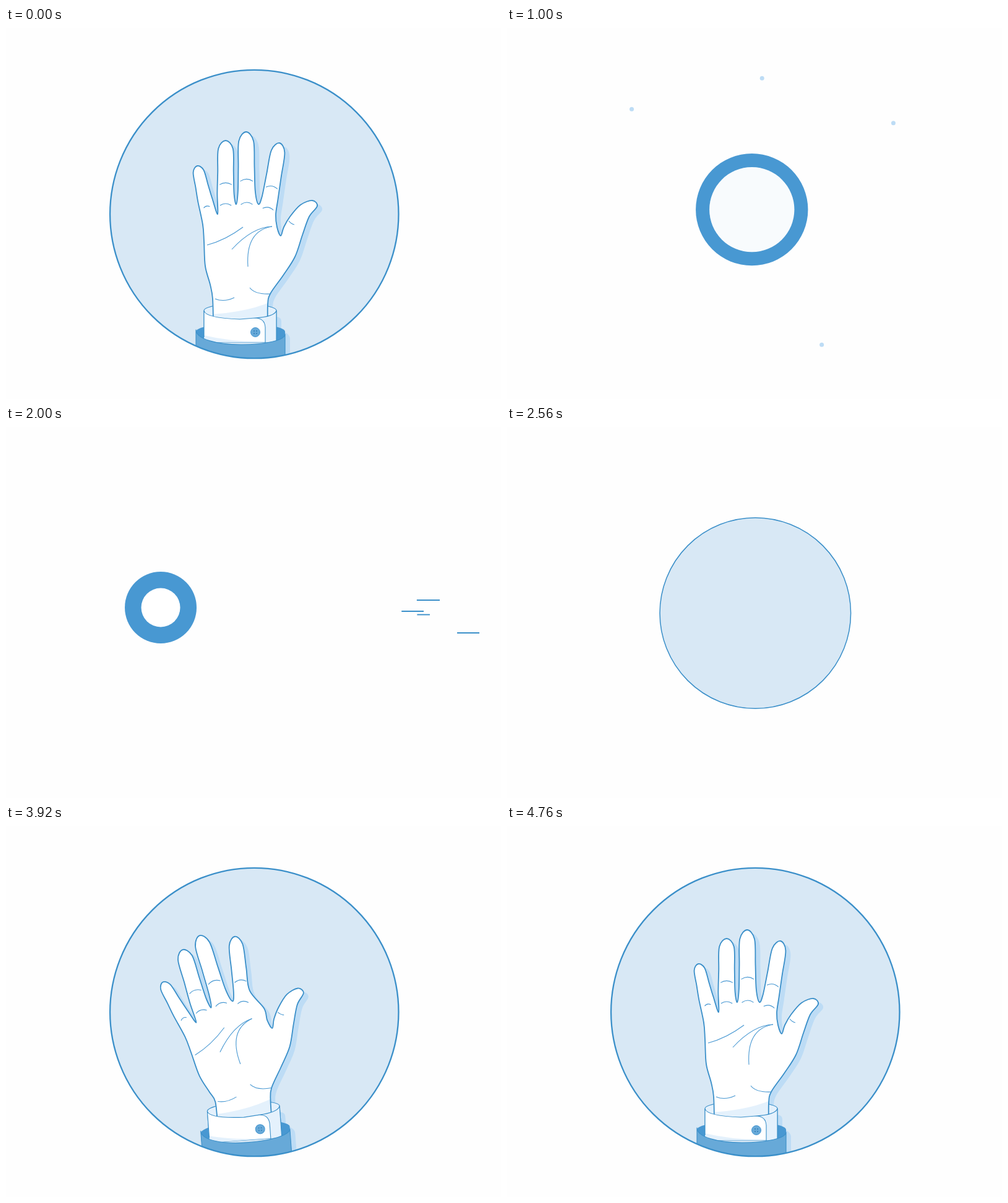
Write an HTML page with a canvas that moves like this. It is 800 by 600 pixels and loops after 4.8 s.

```html
<!DOCTYPE html>
<html lang="en">
<head>
<meta charset="utf-8">
<title>Waving hand</title>
<style>
  html, body { margin: 0; width: 100%; height: 100%; overflow: hidden; background: #fefefe; }
  canvas { display: block; }
</style>
</head>
<body>
<canvas id="stage" width="800" height="600"></canvas>
<script>
const ctx = document.getElementById('stage').getContext('2d');
const LOOP = 4800;
const INK = '#3a8fc9', BLUE = '#4898d2', SLEEVE = '#67a9d8', SKY = '#d8e8f5',
      SHADE = '#bddcf5', PALE = '#e4f1fc', WHITE = '#fff';

// time, lean in degrees, x and y shift, curl
const keys = [
  [40, 0, 0, 0, 0], [520, -8, -27, -4, 1], [720, -8, -27, -4, 1], [1000, -8, -27, 300, 1],
  [2760, 10.5, 17, 385, 0], [3200, 10.5, 17, 95, 0], [3900, -17, 7, 0, 0],
  [4220, 0, 0, 0, 0], [4480, -17, 7, 0, 0], [4740, 0, 0, 0, 0]
];

const clamp = x => Math.min(1, Math.max(0, x));
const span = (t, a, b) => clamp((t - a) / (b - a));
const smooth = x => x * x * (3 - 2 * x);
const easeOut = (x, n) => 1 - (1 - x) ** n;
const mix = (a, b, k) => a + (b - a) * k;
const radians = deg => deg * Math.PI / 180;

function poseAt(t) {
  const i = keys.findIndex(key => key[0] > t);
  const to = keys[i < 0 ? keys.length - 1 : i];
  const from = i > 0 ? keys[i - 1] : to;
  const k = smooth(span(t, from[0], to[0]));
  const [, lean, dx, dy, curl] = from.map((v, j) => mix(v, to[j], k));
  return { lean, dx, dy, curl };
}

// Catmull-Rom curve through points
function curve(points) {
  const path = new Path2D(), last = points.length - 1;
  const at = i => points[Math.min(last, Math.max(0, i))];
  const handle = (i, s) => [0, 1].map(c => at(i)[c] + s * (at(i + 1)[c] - at(i - 1)[c]) / 6);
  path.moveTo(...points[0]);
  for (let i = 0; i < last; i++)
    path.bezierCurveTo(...handle(i, 1), ...handle(i + 1, -1), ...at(i + 1));
  return path;
}

function draw(path, fill, stroke, width = 1.1) {
  const shape = typeof path === 'string' ? new Path2D(path) : path;
  if (fill) { ctx.fillStyle = fill; ctx.fill(shape); }
  if (stroke) { ctx.strokeStyle = stroke; ctx.lineWidth = width; ctx.stroke(shape); }
}

function disc(x, y, r, fill, stroke, width) {
  const path = new Path2D();
  path.arc(x, y, Math.max(0, r), 0, 7);
  draw(path, fill, stroke, width);
}

function scoped(paint) {
  ctx.save();
  paint();
  ctx.restore();
}

function clipped(x, y, r, paint) {
  scoped(() => {
    ctx.beginPath();
    ctx.arc(x, y, r, 0, 7);
    ctx.clip();
    paint();
  });
}

// base, tip, width at base and tip; from little finger to index
const fingers = [
  [324, 288, 309, 223, 25, 16], [355, 284, 355, 182, 28, 23],
  [389, 282, 388, 168, 29, 23], [424, 290, 442, 186, 27, 21]
];
const valleys = [[342, 301], [372, 285], [408, 285]];
const palmSide = [[335, 482], [334, 438], [330, 415], [322, 385], [320, 345], [318, 318]];
const thumbSide = [[436, 302], [438, 322], [444, 336], [449, 322], [459, 305], [476, 286],
  [495, 279], [503, 288], [490, 305], [479, 335], [467, 370], [448, 400], [427, 430],
  [423, 448], [423, 482]];
const palmLines = [
  [[325, 351], [355, 343], [383, 322]], [[365, 358], [398, 322], [430, 321]],
  [[391, 386], [387, 328], [430, 321]], [[338, 438], [352, 444], [369, 436]]
];
const thumbLines = [
  [[457, 312], [461, 317], [466, 318]], [[394, 420], [402, 431], [427, 430]]
];

// Point on a finger: u runs from base to tip, side from -1 (left) to 1 (right).
function onFinger([x, y, tipX, tipY, wide, narrow], u, side, reach) {
  const dx = tipX - x, dy = tipY - y;
  const s = side * mix(wide, narrow, u) / 2 / Math.hypot(dx, dy);
  return [x + dx * u * reach - dy * s, y + dy * u * reach + dx * s];
}

function fingerOutline(finger, reach) {
  const up = [.15, .5, .87];
  return [...up.map(u => onFinger(finger, u, -1, reach)), onFinger(finger, 1, 0, reach),
          ...up.reverse().map(u => onFinger(finger, u, 1, reach))];
}

function fingerCrease(finger, u, width, reach) {
  return [onFinger(finger, u, -width, reach), onFinger(finger, u + .06, 0, reach),
          onFinger(finger, u, width, reach)];
}

// Turns a point about the wrist; the turn fades out towards the cuff.
function bend([x, y], deg) {
  const a = radians(deg * smooth(span(y, 460, 415))), dx = x - 379, dy = y - 440;
  return [379 + dx * Math.cos(a) - dy * Math.sin(a), 440 + dx * Math.sin(a) + dy * Math.cos(a)];
}

function openHand({ lean, curl }) {
  const reach = 1 - 1.1 * curl, turn = lean * .75;
  const spread = Math.min(7.5, Math.abs(lean) * .6);
  const main = p => bend(p, turn), thumb = p => bend(p, turn + spread);
  const upper = fingers.flatMap((f, i) => [...fingerOutline(f, reach), ...valleys.slice(i, i + 1)]);
  const creases = fingers.flatMap((f, i) => [
    fingerCrease(f, -.03, i ? .65 : .4, reach), ...(i ? [fingerCrease(f, .3, .75, reach)] : [])]);
  return {
    shape: curve([...[...palmSide, ...upper].map(main), ...thumbSide.map(thumb)]),
    lines: [...[...creases, ...palmLines].map(l => l.map(main)), ...thumbLines.map(l => l.map(thumb))]
  };
}

const pinchShape = new Path2D('M308 482L310 430Q311 405 312 380C313 350 330 320 347 296Q332 290 332 280' +
  'Q333 275 337 272Q332 268 336 261Q340 257 367 262Q364 252 370 249Q378 245 388 255Q400 258 411 264' +
  'Q418 265 431 274C442 266 458 267 470 268Q484 272 481 286C478 305 470 325 460 343Q440 365 420 386' +
  'L390 421Q391 445 396 482');

function pinchDetails() {
  draw('M336 271Q350 268 368 265M333 286Q341 297 352 295L361 291M367 262Q373 269 368 271M399 288Q403 300 415 304', null, INK, 1.5);
  draw('M431 274C418 282 413 294 415 301C421 309 436 304 445 299', WHITE, INK, 1.7);
  const thumb = 'M335 375C332 357 352 342 366 322C362 311 359 299 360 286C361 266 386 267 391 280C396 294 399 312 403 327Q412 341 415 355';
  draw(thumb + 'L372 366Z', WHITE);
  draw(thumb + 'M366 322Q358 344 372 366', null, INK, 1.7);
  draw('M369 317Q378 321 386 317M349 319Q357 317 364 319M350 300Q355 305 361 304M401 318Q426 318 445 333' +
    'M445 299Q451 307 457 319M449 298Q460 291 473 294M404 293Q410 295 413 292M338 384Q343 398 357 403M312 384Q321 381 330 386', null, BLUE);
}

function cuffBack() {
  draw('M437 467Q445 468 445 474V490Q459 494 459 503V580H430Z', SHADE);
  draw('M307 491A72 13 0 0 1 451 491V505H307Z', BLUE);
  draw('M320 457A58.5 11 0 0 1 437 457V508H320Z', PALE, INK);
}

function cuffFront() {
  const rim = 'M320 457Q322 469 378 471L402 469';
  draw(rim + 'Q434 467 437 457V508H320Z', PALE);
  draw(rim + 'Q418 469 419 484V507Q365 508 320 497Z', WHITE);
  draw('M320 500V457' + rim + 'Q418 469 419 484V512M402 469Q434 467 437 457V508', null, INK);
  disc(403, 492, 7.5, SLEEVE, BLUE, 1);
  for (const x of [401, 405]) for (const y of [490, 494]) disc(x, y, .9, '#2b78b4');
  draw('M307 488C307 503 340 512 380 512C420 512 451 505 451 495V590H307Z', SLEEVE, INK);
}

function drawHand(t) {
  const pose = poseAt(t), { lean, dx, dy, curl } = pose;
  const pinched = curl > .5;
  const { shape, lines } = pinched ? { shape: pinchShape, lines: [] } : openHand(pose);

  const onArm = paint => scoped(() => {
    ctx.translate(379 + dx, 480 + dy);
    ctx.rotate(radians(lean / 4));
    ctx.scale(1 - .03 * curl, 1);
    ctx.translate(-379, -480);
    paint();
  });
  const onHand = paint => pinched
    ? scoped(() => { ctx.translate(dx + 27, dy + 4); paint(); })
    : onArm(paint);

  scoped(() => {
    ctx.translate(8, 6);
    onHand(() => draw(shape, SHADE));
  });
  onArm(cuffBack);
  onHand(() => {
    draw(shape, WHITE);
    scoped(() => {
      ctx.clip(shape);
      draw('M300 464Q380 464 430 442V490H300Z', PALE);
    });
    draw(shape, null, INK, 1.8);
    ctx.globalAlpha = Math.abs(1 - 2 * curl);
    for (const [from, mid, to] of lines)
      draw(`M${from}Q${mid} ${to}`, null, BLUE);
    if (pinched) pinchDetails();
    ctx.globalAlpha = 1;
  });
  onArm(cuffFront);
}

function drawBadge(t) {
  const scale = t < 2000 ? 1 : easeOut(span(t, 2310, 2910), 2);
  if (!scale) return;
  disc(401.3, 301, 233.5 * scale, SKY);
  if (t < 1000 || t > 2760) clipped(401.3, 301, 233 * scale, () => drawHand(t));
  disc(401.3, 301, 233.2 * scale, null, INK, 2.3 * scale);
}

// The badge shrinks into a thick ring that later rushes off to the left.
function drawRing(t) {
  const k = smooth(span(t, 740, 1100)), gone = span(t, 1700, 2240) ** 2;
  const x = mix(401.3, 394.5, k) - 465 * gone, y = mix(301, 292, k);
  const inner = mix(232, 31.5, k);
  disc(x, y, mix(234.4, 58, k), BLUE);
  disc(x, y, inner, WHITE);
  ctx.globalAlpha = 1 - k;
  disc(x, y, inner, SKY);
  ctx.globalAlpha = 1;
  if (t < 1000) clipped(x, y, inner, () => drawHand(t));
}

// x and y offset, time of disappearance
const dots = [[-240, -200, 1640], [286, -172, 1640], [142, 274, 1570], [22, -262, 1460]];

function drawDots(t) {
  const k = easeOut(span(t, 740, 1520), 4);
  for (const [dx, dy, end] of dots) {
    ctx.globalAlpha = span(t, end, end - 110);
    disc(394.5 + dx * k, 292 + dy * k, 3.5, SHADE);
  }
  ctx.globalAlpha = 1;
}

const streaks = [[387, 576, 280], [368, 550, 298], [455, 560, 303.5], [457, 640, 333]];

function drawStreaks(t) {
  const grow = span(t, 1360, 1500), fade = span(t, 1760, 2060), shift = (t - 1520) * .26;
  if (!grow || fade === 1) return;
  for (const [a, b, y] of streaks)
    draw(`M${mix(a, b, fade) + shift} ${y}H${mix(a, b, grow) + shift}`, null, INK, 1.9);
}

function frame() {
  const t = performance.now() % LOOP;
  ctx.fillStyle = '#fefefe';
  ctx.fillRect(0, 0, 800, 600);
  ctx.lineJoin = 'round';
  if (t < 740 || t > 2280) drawBadge(t);
  else {
    drawDots(t);
    drawRing(t);
    drawStreaks(t);
  }
  requestAnimationFrame(frame);
}
frame();
</script>
</body>
</html>
```
